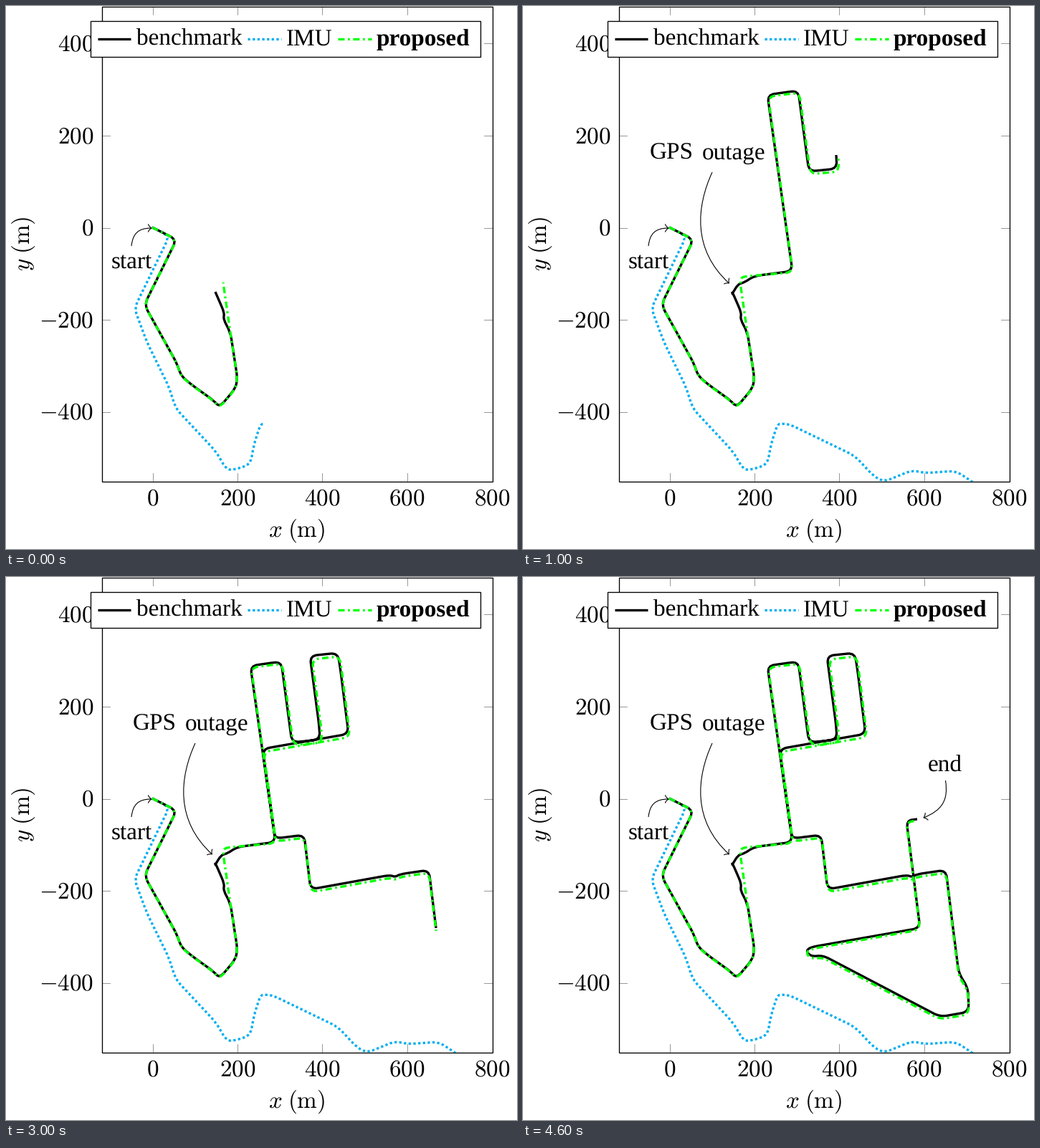
Recreate the animation shown at these times as a matplotlib script. Size 713 px wide and 758 px high, loop 5 s.

```python
import numpy as np
import matplotlib.pyplot as plt
from matplotlib.animation import FuncAnimation
from matplotlib.patches import PathPatch, Rectangle
from matplotlib.path import Path

W, H, DPI = 713, 758, 64
PX = 72 / DPI                      # points per pixel
EM = 33.2 * PX
LINE, THIN, HAIR = 3.32 * PX, 1.33 * PX, 1.1 * PX
LEFT, RIGHT, TOP, BOTTOM = 133.5, 678.5, 0.5, 663.5
DOTS, DASHDOT = (0, (1, 1)), (0, (2.7, 1.4, 0.8, 1.4))
CYAN, GREEN = "#00aeef", "#00ff00"

plt.rcParams.update({
    "font.family": "Liberation Serif",
    "mathtext.fontset": "cm",
    "text.hinting": "none",
})

# Corners of the drive in stage pixels, one leg per second.
south = [(204, 309), (238, 326), (193, 417), (239, 500), (244, 516),
         (258, 528), (290, 551), (298, 560), (320, 534), (323, 520),
         (313, 455)]
tower = [(376, 370), (341, 124), (384, 118), (399, 231), (438, 227),
         (437, 208)]
twin = [(424, 110), (463, 106), (467, 132), (478, 219), (358, 240),
        (374, 355)]
east = [(376, 365), (416, 360), (425, 436), (536, 416), (543, 419),
        (549, 415), (590, 409), (600, 490)]
home = [(608, 553), (621, 574), (622, 607), (582, 614), (418, 528),
        (403, 530), (395, 523), (400, 517), (554, 490), (535, 340),
        (550, 338)]

# The benchmark wanders through the outage, the proposed track cuts across.
wander = [(303, 437), (305, 429), (292, 399)]
rejoin = [(292, 402), (300, 388), (309, 386), (322, 377)]
bench = [south + wander, rejoin + tower, twin, east, home]
cut = [south + [(303, 385)], [(304, 377)] + tower, twin, east, home]
imu = [[(204, 309), (228, 321), (179, 422), (197, 470), (227, 531),
        (237, 562), (293, 622), (307, 646), (316, 648), (341, 640),
        (346, 612), (355, 584), (361, 583)],
       [(372, 584), (463, 628), (490, 657), (504, 664), (543, 648),
        (560, 652), (604, 649), (637, 671)]]


def drift(leg, k):
    """Slowly varying offset of the proposed track during leg k."""
    t = np.linspace(k, k + 1, len(leg))
    dx = np.interp(t, range(6), [0, 0, 3, 1, 0, 0])
    dy = np.interp(t, range(6), [0, 1, 5, 4, 4, 2])
    return np.array(leg) + np.column_stack([dx, dy])


def smooth(legs, r=10):
    """Join the legs into one path with rounded corners."""
    pts = np.concatenate(legs).astype(float)
    verts, codes = [pts[0]], [Path.MOVETO]
    for a, b, c in zip(pts, pts[1:], pts[2:]):
        ba, bc = a - b, c - b
        verts += [b + ba * min(0.5, r / np.hypot(*ba)), b,
                  b + bc * min(0.5, r / np.hypot(*bc))]
        codes += [Path.LINETO, Path.CURVE3, Path.CURVE3]
    return Path(verts + [pts[-1]], codes + [Path.LINETO])


fig = plt.figure(figsize=(W / DPI, H / DPI), dpi=DPI, facecolor="white")
ax = fig.add_axes([0, 0, 1, 1])
ax.set(xlim=(0, W), ylim=(H, 0))
ax.axis("off")


def stroke(path, color="black", lw=HAIR, z=6, **kw):
    return ax.add_patch(PathPatch(path, fill=False, ec=color, lw=lw, zorder=z,
                                  capstyle="butt", **kw))


def label(x, y, text, z=6, **kw):
    return ax.text(x, y, text, fontsize=EM, va="baseline", zorder=z, **kw)


def arrow(a, b, c, d):
    """Thin curved arrow with an open, hooked head."""
    head = np.array([(-4.6, 5.6), (-3.9, 2.9), (-1, 0.4), (0, 0),
                     (-1, -0.4), (-3.9, -2.9), (-4.6, -5.6)])
    ux, uy = np.subtract(d, c) / np.hypot(*np.subtract(d, c))
    head = head @ np.array([(ux, uy), (-uy, ux)]) + d
    curve = [Path.MOVETO] + [Path.CURVE4] * 3
    return [stroke(Path([a, b, c, d], curve)),
            stroke(Path(head, curve + [Path.CURVE4] * 3))]


def tick(x, y, dx, dy):
    ax.plot([x, x + dx], [y, y + dy], color="gray", lw=0.8 * PX, zorder=1)


# Axes
for v in range(0, 801, 200):
    x = 204.5 + 0.592 * v
    label(x, 696, f"${v}$", z=2, ha="center")
    if v < 800:
        tick(x, BOTTOM, 0, -11.5)
        tick(x, TOP, 0, 11.5)
for v in range(-400, 401, 200):
    y = 309.5 - 0.643 * v
    label(122, y + 10, f"${v}$", z=2, ha="right")
    tick(LEFT, y, 11.5, 0)
    tick(RIGHT, y, -11.5, 0)
frame = dict(xy=(LEFT, TOP), width=RIGHT - LEFT, height=BOTTOM - TOP)
ax.add_patch(Rectangle(**frame, fill=False, ec="black", lw=THIN, zorder=2))
label(406, 742, r"$x\;\mathrm{(m)}$", ha="center")
label(34, 332, r"$y\;\mathrm{(m)}$", ha="center", rotation=90,
      rotation_mode="anchor")

# Legend
ax.add_patch(Rectangle((117.5, 20.5), 544, 50, fc="white", ec="black",
                       lw=THIN, zorder=4))
for x, color, style, tx, name, weight in (
        (127.5, "black", "-", 182.5, "benchmark", "normal"),
        (337, CYAN, DOTS, 390.5, "IMU", "normal"),
        (463, GREEN, DASHDOT, 517, "proposed", "bold")):
    stroke(Path([(x, 45.5), (x + 46.5, 45.5)]), color, LINE, 5, ls=style)
    label(tx, 55, name, weight=weight)

# Routes
proposed = [drift(leg, k) for k, leg in enumerate(cut)]
routes = [(imu, CYAN, DOTS), (bench, "black", "-"), (proposed, GREEN, DASHDOT)]
area = Rectangle(**frame, transform=ax.transData)
lines = []
for legs, color, style in routes:
    line = stroke(smooth(legs[:1]), color, LINE, 3, ls=style)
    line.set_clip_path(area)
    lines.append(line)

# Notes
label(146.5, 366, "start")
arrow((175, 335), (177, 318), (184, 310), (203, 310))
outage = [label(177, 214, "GPS"), label(249.5, 214, "outage"),
          *arrow((264, 232), (242, 280), (236, 340), (287.5, 387))]
finish = [label(564.5, 272, "end"),
          *arrow((589.5, 284), (594, 312), (584, 326), (559, 336))]


def draw(i):
    for line, (legs, *_) in zip(lines, routes):
        line.set_path(smooth(legs[:i + 1]))
    for artist in outage:
        artist.set_visible(i >= 1)
    for artist in finish:
        artist.set_visible(i >= 4)
    return lines + outage + finish


anim = FuncAnimation(fig, draw, frames=5, interval=1000, repeat=True,
                     repeat_delay=0, init_func=lambda: draw(0), blit=False)
plt.show()
```
